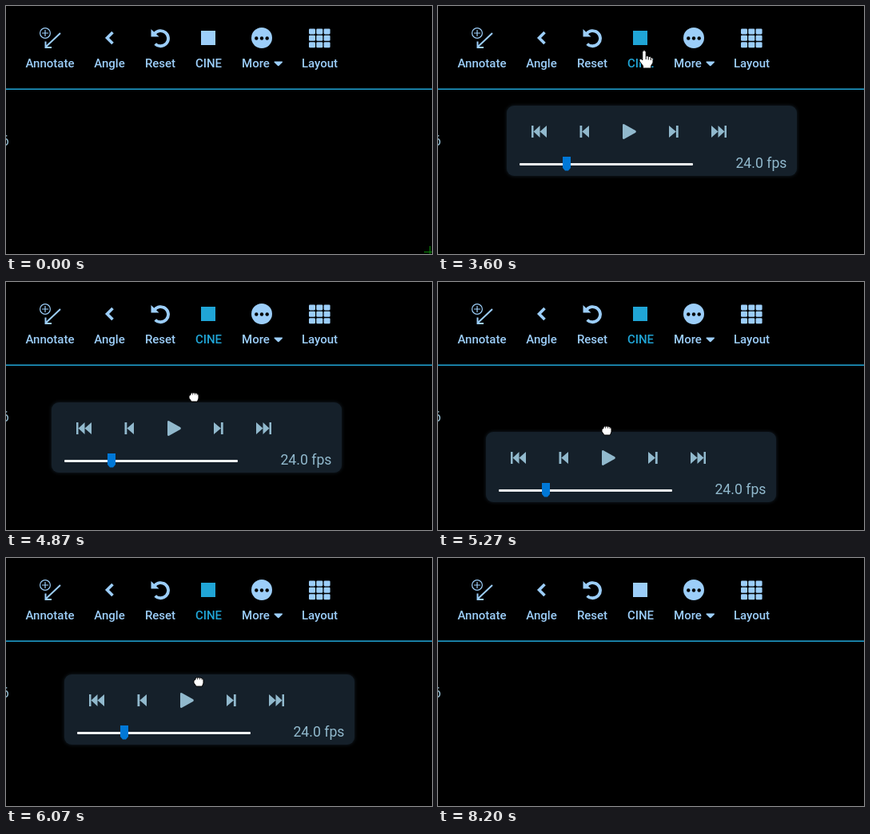
Write an HTML page that moves like this. It is 533 px wide and 311 px high and loops after 9.14 s.

```html
<!DOCTYPE html>
<html lang="en">
<head>
<meta charset="utf-8">
<title>Cine player</title>
<style>
  html, body { margin: 0; width: 100%; height: 100%; overflow: hidden; background: #000; }
  svg { display: block; width: 100%; height: 100%; }
  text { font-family: Roboto, sans-serif; }
  .tool { fill: #9ccef9; color: #9ccef9; }
  .tool text { font-size: 15px; font-weight: 500; text-anchor: middle; }
  .tool.active { fill: #20a5d6; }
  .tool.hover { fill: #fff; }
  .line { fill: none; stroke: currentColor; }
  .info { fill: #91b9cd; font-size: 17.7px; text-anchor: end; }
  .panel { filter: drop-shadow(0 0 2px #15202a); }
  .button { fill: #91b9cd; }
  .button.hover { fill: #fff; }
  .cursor { fill: #fff; stroke: #000; stroke-linejoin: round; }
  .cursor .crease { fill: none; }
</style>
</head>
<body>
<svg viewBox="0 0 533 311" preserveAspectRatio="none">
  <rect width="533" height="311"/>
  <rect y="103.5" width="533" height="1.5" fill="#20a5d6"/>
  <text class="info" x="4" y="174.5">6</text>

  <g class="tool">
    <g class="line">
      <circle cx="49" cy="34" r="6.4" stroke-width="1.2"/>
      <path d="M45 34h8M49 30v8" stroke-width="1.2"/>
      <path d="M68 34L49.5 51.5M49.5 44.5V52H57" stroke-width="2"/>
    </g>
    <text x="55" y="77">Annotate</text>
  </g>
  <g class="tool">
    <path class="line" d="M133.5 33L126.5 40L133.5 47" stroke-width="3.6"/>
    <text x="129.5" y="77">Angle</text>
  </g>
  <g class="tool">
    <path class="line" d="M185.7 35A9.6 9.6 0 1 1 186.7 47.5" stroke-width="3.8"/>
    <path d="M181.5 29V38.5H191.5Z"/>
    <text x="193" y="77">Reset</text>
  </g>
  <g class="tool" id="cine">
    <rect x="244" y="31" width="18" height="18"/>
    <text x="253.5" y="77">CINE</text>
  </g>
  <g class="tool">
    <circle cx="320" cy="40" r="13"/>
    <g fill="#000">
      <circle cx="313.3" cy="40.5" r="2.2"/><circle cx="320" cy="40.5" r="2.2"/><circle cx="326.7" cy="40.5" r="2.2"/>
    </g>
    <text x="312.5" y="77">More</text>
    <path d="M336 69.5H345.5Q346.5 70 345.8 70.8L341.5 75Q340.7 75.6 340 75L335.7 70.8Q335 70 336 69.5Z"/>
  </g>
  <g class="tool">
    <g id="grid"></g>
    <text x="392.5" y="77">Layout</text>
  </g>

  <g class="panel" id="panel">
    <rect width="363" height="88" rx="9" fill="#15202a"/>
    <path class="button" d="M31 25h2.5v15H31zM41.5 25v15L33.5 32.5zM50 25v15L41.5 32.5z"/>
    <path class="button" d="M91.5 25h2.8v15h-2.8zM103 25v15L94.3 32.5z"/>
    <path class="button" d="M145 24.5Q145 22.5 147 23.3L161.3 31.3Q162.5 32.5 161.3 33.7L147 41.7Q145 42.5 145 40.5Z"/>
    <path class="button" d="M214.7 25h-2.8v15h2.8zM203 25v15L211.9 32.5z"/>
    <path class="button" d="M275 25h-2.5v15H275zM264.5 25v15L272.5 32.5zM256 25v15L264.5 32.5z"/>
    <rect x="16" y="72" width="217" height="3" rx="1" fill="#eef1f2"/>
    <path d="M70 64H80V78L77 81.5H73L70 78Z" fill="#0078d7"/>
    <text class="info" x="350.5" y="78">24.0 fps</text>
  </g>

  <g id="cursors">
    <g class="cursor" data-kind="cross" style="stroke:#0a8a0a">
      <path d="M-7 .5H8M.5-7V8"/>
    </g>
    <g class="cursor" data-kind="arrow">
      <path d="M0 0V16L3.7 12.5L6.3 18.5L8.8 17.4L6.3 11.6H11.5Z"/>
    </g>
    <g class="cursor" data-kind="pointer">
      <path d="M-2.2 1Q0-1.8 2.2 1V7Q4.2 5.6 5.2 7.6Q7.2 6.6 8.2 8.6Q10.6 8 11 10.5V15L8.6 19V22H-1.5V19.2L-6 13Q-6.6 9.8-4 10.2L-2.2 12Z"/>
      <path class="crease" d="M2.2 7V11M5.2 8V11.5M8.2 9V12"/>
    </g>
    <g class="cursor" data-kind="open">
      <path d="M-3.5 1L-5.5-4Q-5-6.5-3-5L-1.5-2L-2-6.5Q-.8-8.5.7-6.5L1-2L2-6.5Q3.5-8 4.3-6L4-1.5L5.5-4Q7.5-4.5 7.3-2L6 4L4.5 8.5H-2.5L-7.5 2Q-7-.8-3.5 1Z"/>
    </g>
    <g class="cursor" data-kind="fist">
      <path d="M-6-.5Q-6.2-2.4-4-2.4V-4Q-3-6-1.4-4.6Q0-6 1.4-4.6Q3-5.6 4-4Q6-4.2 6-2V2L4.4 6H-3L-6 1.5Z"/>
      <path class="crease" d="M-1.4-4V-2.5M1.4-4V-2.5M4-3.5V-2" stroke-width=".7"/>
    </g>
  </g>
</svg>
<script>
const LOOP = 9140, TICK = 1000 / 15;
// Ticks at which the panel opens, is grabbed, stops circling, is let go and closes.
const OPEN = 40, GRAB = 65, SETTLE = 87.6, DROP = 92, CLOSE = 110;
const DEGREE = Math.PI / 180;

const point = (x, y) => ({ x, y });
const add = (a, b) => point(a.x + b.x, a.y + b.y);
const mix = (a, b, u) => point(a.x + (b.x - a.x) * u, a.y + (b.y - a.y) * u);
const snap = p => point(Math.round(p.x), Math.round(p.y));
const ease = (from, to, t) => {
  const u = Math.min(Math.max((t - from) / (to - from), 0), 1);
  return u * u * (3 - 2 * u);
};

const grip = point(164, 10);
const panelStart = point(86, 125), panelEnd = point(78, 145);
const wide = { centre: point(122, 170), radius: point(70, 53) };
const tight = { centre: panelEnd, radius: point(42, 47) };

const moves = [
  { from: 8, to: 10, end: point(533, 310) },
  { from: 17, to: 17.01, end: point(327, 194) },
  { from: 17, to: 30, end: point(261, 60) },
  { from: 30, to: 33, end: point(258, 52) },
  { from: 53, to: 61, end: add(panelStart, grip) },
  { from: GRAB, to: DROP, end: add(panelEnd, grip) },
  { from: DROP, to: 98, end: point(250, 12) },
  { from: 99, to: 103, end: point(250, 35) },
  { from: 120, to: 122, end: point(118, 286) }
];

const byId = id => document.getElementById(id);
const cine = byId('cine'), panel = byId('panel');
const buttons = [...panel.querySelectorAll('.button')];
const cursors = [...byId('cursors').children];
const centres = buttons.map(button => {
  const b = button.getBBox();
  return point(b.x + b.width / 2, b.y + b.height / 2);
});

byId('grid').innerHTML = Array.from({ length: 9 }, (_, i) =>
  `<rect x="${379 + i % 3 * 9.3}" y="${28.4 + Math.floor(i / 3) * 8.4}" width="8" height="7" rx="1.3"/>`).join('');

// The panel is swung clockwise, first in a wide circle, then in tighter and faster ones.
function panelAt(tick) {
  const u = Math.min(tick, SETTLE) - 67;
  const angle = (-58 + 41.9 * u + 0.21 * u * u) * DEGREE;
  const narrowing = ease(74, 79, tick);
  const centre = mix(wide.centre, tight.centre, narrowing);
  const radius = mix(wide.radius, tight.radius, narrowing);
  const swing = add(centre, point(radius.x * Math.cos(angle), radius.y * Math.sin(angle)));
  return mix(mix(panelStart, swing, ease(GRAB, 67, tick)), panelEnd, ease(SETTLE, DROP, tick));
}

// While dragging, the panel trails the pointer by half a tick.
function cursorAt(tick) {
  if (tick >= GRAB && tick < DROP) return add(panelAt(tick + 0.5), grip);
  return moves.reduce((at, move) => mix(at, move.end, ease(move.from, move.to, tick)), point(530, 308));
}

function cursorKind(tick, at, rel, open, overCine) {
  if (tick >= 10 && tick < 17 || tick >= 123) return '';
  if (at.y < 104) return overCine ? 'pointer' : 'arrow';
  if (!open || rel.y < -8) return 'cross';
  if (rel.y > 21) return 'pointer';
  return tick >= GRAB && tick <= DROP ? 'fist' : 'open';
}

function draw(time) {
  const tick = Math.floor((time % LOOP + 4) / TICK);
  const open = tick >= OPEN && tick < CLOSE;
  const at = snap(cursorAt(tick)), box = snap(panelAt(tick));
  const rel = point(at.x - box.x, at.y - box.y);
  const overCine = at.x > 236 && at.x < 272 && at.y < 85;
  const kind = cursorKind(tick, at, rel, open, overCine);

  cine.classList.toggle('active', open);
  cine.classList.toggle('hover', !open && overCine && kind !== '');
  panel.style.display = open ? '' : 'none';
  panel.setAttribute('transform', `translate(${box.x} ${box.y})`);
  buttons.forEach((button, i) => button.classList.toggle('hover', kind === 'pointer'
    && Math.abs(rel.x - centres[i].x) < 20 && Math.abs(rel.y - centres[i].y) < 17));
  for (const cursor of cursors) {
    cursor.style.display = cursor.dataset.kind === kind ? '' : 'none';
    cursor.setAttribute('transform', `translate(${at.x} ${at.y})`);
  }
}

const start = performance.now();
function loop() {
  draw(performance.now() - start);
  requestAnimationFrame(loop);
}
loop();
</script>
</body>
</html>
```
